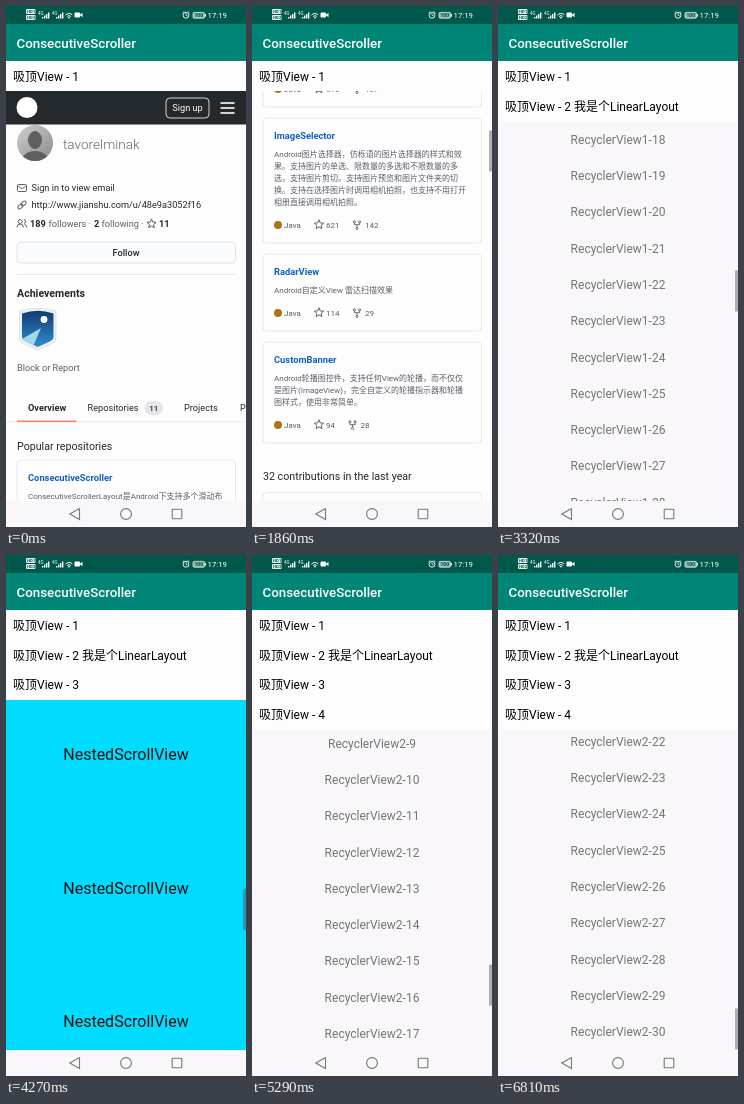
Animation of 240 by 521 pixels, one loop 6840 ms. Source, as an HTML page with a canvas:

```html
<!DOCTYPE html>
<html lang="zh-CN">
<head>
<meta charset="utf-8">
<title>ConsecutiveScroller</title>
<style>
html, body { margin: 0; width: 100%; height: 100%; overflow: hidden; background: #fff; }
canvas { display: block; width: 240px; height: 521px; }
</style>
</head>
<body>
<canvas id="stage"></canvas>
<script>
const W = 240, H = 521, LOOP = 6840, STEP = LOOP / 202;
const TOP = 55.4, BOTTOM = 495, BAR = 29.7, ROW = 36.3, BLOCK = 133.5;
const FONT = "Roboto, 'Noto Sans CJK SC', 'Noto Sans CJK', sans-serif";
const INK = '#24292e', GREY = '#586069', LINE = '#e1e4e8', BLUE = '#0d60c8', LINK = '#2f6cb3';
const WHITE = '#fefdfe', PAPER = '#f9f7fa';

const canvas = document.getElementById('stage');
const ratio = window.devicePixelRatio || 1;
canvas.width = W * ratio;
canvas.height = H * ratio;
const c = canvas.getContext('2d');

// Document layout, in pixels from the top of the unscrolled screen
const BAR2 = 1718, LIST1 = BAR2 + BAR;
const BAR3 = LIST1 + 30 * ROW, NESTED = BAR3 + BAR;
const BAR4 = NESTED + 6 * BLOCK, LIST2 = BAR4 + BAR;
const END = LIST2 + 30 * ROW - BOTTOM;

const bars = [
  ['吸顶View - 1', TOP],
  ['吸顶View - 2 我是个LinearLayout', BAR2],
  ['吸顶View - 3', BAR3],
  ['吸顶View - 4', BAR4]
];

const repos = [
  ['ConsecutiveScroller', 1265, 176, [
    'ConsecutiveScrollerLayout是Android下支持多个滑动布',
    '局(RecyclerView、WebView、ViewPager等)和普通控件',
    '(TextView、ImageView、LinearLayout、自定义View等)',
    '持续连贯滑动的容器，它使所有的子View像一个整体',
    '一样连续顺畅滑动。并且支持布局吸顶功能，以及滑',
    '动到指定的位置。']],
  ['GroupedRecyclerViewAdapter', 860, 148, [
    'GroupedRecyclerViewAdapter可以很方便的实现',
    'RecyclerView的分组显示，并且每个组都可以包含组',
    '头、组尾和子项；可以方便实现多种Type类型的列',
    '表，可以实现列表的展开收起功能，还可以实现头部',
    '悬浮吸顶功能等。']],
  ['LabelsView', 510, 107, [
    'Android标签列表控件，可以设置标签的选中效果。支',
    '持单选、多选，支持标签的自动换行，也支持自定义',
    '标签的样式。']],
  ['ImageSelector', 621, 142, [
    'Android图片选择器，仿栎语的图片选择器的样式和效',
    '果。支持图片的单选、限数量的多选和不限数量的多',
    '选，支持图片剪切。支持图片预览和图片文件夹的切',
    '换。支持在选择图片时调用相机拍照，也支持不用打开',
    '相册直接调用相机拍照。']],
  ['RadarView', 114, 29, ['Android自定义View 雷达扫描效果']],
  ['CustomBanner', 94, 28, [
    'Android轮播图控件，支持任何View的轮播，而不仅仅',
    '是图片(ImageView)，完全自定义的轮播指示器和轮播',
    '图样式，使用非常简单。']]
];

// Scroll path: step, offset, speed per step
const path = [
  [37.5, 0, 0], [55, 738, 39], [78, 1533, 35], [98, 2249.5, 31.5],
  [126, 3000.5, 26.7], [156, 3817.3, 22], [198, END, 0]
];

function scrollAt(n) {
  if (n <= path[0][0]) return 0;
  for (let i = 1; i < path.length; i++) {
    const [n0, a, va] = path[i - 1], [n1, b, vb] = path[i];
    if (n > n1) continue;
    const d = n1 - n0, u = (n - n0) / d, v = 1 - u;
    return a * v * v * (1 + 2 * u) + va * d * u * v * v
      + b * u * u * (3 - 2 * u) - vb * d * u * u * v;
  }
  return END;
}

function text(s, x, y, size, color, weight = 400, align = 'left') {
  c.font = `${weight} ${size}px ${FONT}`;
  c.textAlign = align;
  c.fillStyle = color;
  c.fillText(s, x, y + size * .355);
  return c.measureText(s).width;
}

function rect(x, y, w, h, color) {
  c.fillStyle = color;
  c.fillRect(x, y, w, h);
}

function box(x, y, w, h, r, stroke, fill, lw = .8) {
  c.beginPath();
  c.roundRect(x, y, w, h, r);
  if (fill) { c.fillStyle = fill; c.fill(); }
  if (stroke) { c.strokeStyle = stroke; c.lineWidth = lw; c.stroke(); }
}

function disc(x, y, r, fill, stroke, lw = 1) {
  c.beginPath();
  c.arc(x, y, r, 0, 7);
  if (fill) { c.fillStyle = fill; c.fill(); }
  if (stroke) { c.strokeStyle = stroke; c.lineWidth = lw; c.stroke(); }
}

function lines(color, lw, ...parts) {
  c.beginPath();
  for (const p of parts)
    for (let i = 0; i < p.length; i += 2) i ? c.lineTo(p[i], p[i + 1]) : c.moveTo(p[i], p[i + 1]);
  c.strokeStyle = color;
  c.lineWidth = lw;
  c.stroke();
}

function star(x, y) {
  const p = [];
  for (let i = 0; i <= 10; i++) {
    const r = i % 2 ? 2.2 : 4.9, a = i * Math.PI / 5;
    p.push(x + r * Math.sin(a), y - r * Math.cos(a));
  }
  lines(GREY, 1, p);
}

function fork(x, y) {
  for (const [dx, dy] of [[-2.6, -3.2], [2.6, -3.2], [0, 3.4]]) disc(x + dx, y + dy, 1.1, null, GREY, .9);
  lines(GREY, .9, [x - 2.6, y - 2, x - 2.6, y - .3, x + 2.6, y - .3, x + 2.6, y - 2], [x, y - .3, x, y + 2.2]);
}

function repoCard([name, stars, forks, desc], y) {
  const h = 65 + 12 * desc.length, sy = y + h - 18;
  box(11, y, 218.5, h, 4, LINE);
  text(name, 22, y + 18, 9.33, BLUE, 700);
  desc.forEach((s, i) => text(s, 22, y + 36.5 + 12 * i, 8, GREY));
  disc(26, sy, 4, '#b07219');
  text('Java', 32, sy, 8, GREY);
  star(67, sy - .3);
  const x = 74 + text(stars, 74, sy, 8, GREY) + 17.5;
  fork(x, sy);
  text(forks, x + 8, sy, 8, GREY);
  return h;
}

function pageHeader() {
  rect(0, 85, W, 33.5, INK);
  disc(21, 101.5, 10.5, '#fff');
  box(160, 92, 43, 20, 4, '#fff');
  text('Sign up', 181.5, 102, 9.2, '#fff', 400, 'center');
  for (const y of [97, 102, 107]) lines('#fff', 1.6, [214.5, y, 228.5, y]);
}

function profile() {
  const g = c.createLinearGradient(11, 119, 47, 155);
  g.addColorStop(0, '#cfcfcf');
  g.addColorStop(1, '#8b8b8b');
  disc(29, 137, 18, g);
  c.save();
  c.clip();
  c.fillStyle = '#5f5f5f';
  c.beginPath();
  c.ellipse(29, 134, 7, 9, 0, 0, 7);
  c.ellipse(29, 156, 14, 11, 0, 0, 7);
  c.fill();
  c.restore();
  text('tavorelminak', 57, 138, 13.6, '#666', 300);

  box(11.5, 178.5, 9, 7, 1, GREY, null, 1);
  lines(GREY, .9, [11.5, 179.5, 16, 183, 20.5, 179.5]);
  text('Sign in to view email', 25.5, 182, 9.2, INK);
  c.save();
  c.translate(16, 199);
  c.rotate(-.75);
  box(-5, -1.8, 5.6, 3.6, 1.8, GREY, null, 1);
  box(-.6, -1.8, 5.6, 3.6, 1.8, GREY, null, 1);
  c.restore();
  text('http://www.jianshu.com/u/48e9a3052f16', 25.5, 199, 9.2, INK);

  disc(14.2, 215.5, 2, null, GREY, 1);
  c.beginPath();
  c.arc(14.2, 221.3, 3.2, Math.PI, 0);
  c.moveTo(18, 213.6);
  c.arc(17.6, 215.5, 2, -1.4, 1.4);
  c.moveTo(18.3, 218.3);
  c.arc(17.6, 221.3, 3.2, -1.2, 0);
  c.stroke();
  text('189', 24, 218, 9.2, INK, 700);
  text('followers', 42.5, 218, 9.2, GREY);
  text('·', 82.5, 218, 9.2, GREY);
  text('2', 88, 218, 9.2, INK, 700);
  text('following', 95.5, 218, 9.2, GREY);
  text('·', 135, 218, 9.2, GREY);
  star(145.5, 217.8);
  text('11', 153, 218, 9.2, INK, 700);

  box(11, 236, 218.5, 21, 4, '#d9dce0', '#fafbfc');
  text('Follow', 120, 246.5, 9.2, INK, 500, 'center');
  rect(11, 268, 218.5, .8, LINE);
  text('Achievements', 11, 287, 10.6, INK, 700);
  badge();
  text('Block or Report', 11, 362, 9.2, GREY);
}

function shield(x, y, w, h) {
  c.beginPath();
  c.moveTo(x, y + 3);
  c.quadraticCurveTo(x + w / 2, y - 2.5, x + w, y + 3);
  c.lineTo(x + w, y + h * .72);
  c.quadraticCurveTo(x + w, y + h * .8, x + w * .88, y + h * .85);
  c.lineTo(x + w / 2, y + h);
  c.lineTo(x + w * .12, y + h * .85);
  c.quadraticCurveTo(x, y + h * .8, x, y + h * .72);
  c.closePath();
}

function badge() {
  shield(13.5, 302, 36.5, 42);
  c.fillStyle = '#eef1f4';
  c.fill();
  c.strokeStyle = '#d5dae0';
  c.lineWidth = .7;
  c.stroke();
  const g = c.createLinearGradient(0, 304, 0, 342);
  g.addColorStop(0, '#123a72');
  g.addColorStop(1, '#2f8fd0');
  shield(16, 304.5, 31.5, 36.5);
  c.fillStyle = g;
  c.fill();
  c.save();
  c.clip();
  disc(38, 313.5, 3.4, '#fff');
  c.fillStyle = '#9fd8ee';
  c.beginPath();
  c.moveTo(16, 333);
  c.lineTo(35, 322);
  c.lineTo(26, 343);
  c.lineTo(16, 343);
  c.fill();
  c.restore();
}

function tabs() {
  text('Overview', 22, 402, 9.2, INK, 700);
  text('Repositories', 81.5, 402, 9.2, INK);
  box(138.5, 395, 18.5, 14, 7, null, '#e4e6e9');
  text('11', 147.8, 402, 8, INK, 500, 'center');
  text('Projects', 178, 402, 9.2, INK);
  text('Packages', 234, 402, 9.2, INK);
  rect(0, 415.5, W, .8, LINE);
  rect(11, 414.5, 59.5, 1.6, '#f9826c');
  text('Popular repositories', 11, 440, 10.67, INK);
}

function activity() {
  text('32 contributions in the last year', 11, 1208.5, 10.67, INK);
  box(11, 1224.5, 218.5, 118, 4, LINE);
  const greens = ['#ebedf0', '#9be9a8', '#40c463'];
  for (let x = 0; x < 20; x++)
    for (let y = 0; y < 7; y++) {
      const n = Math.abs(Math.sin(x * 12.99 + y * 78.23) * 43758.5) % 1;
      rect(20 + x * 10.1, 1246 + y * 10.1, 7.4, 7.4, greens[n > .97 ? 2 : n > .92 ? 1 : 0]);
    }
  text('Less', 140, 1332, 8, GREY);
  greens.forEach((g, i) => rect(162 + i * 10, 1328.5, 7.4, 7.4, g));
  text('More', 196, 1332, 8, GREY);
  text('Contribution activity', 11, 1372, 10.67, INK);
  text('2021', 22, 1404, 8, INK, 700);
  rect(48, 1404, 181, .8, LINE);
  text('tavorelminak has no activity yet for this period.', 120, 1436, 8.5, GREY, 400, 'center');
  box(11, 1466, 218.5, 22, 4, LINE);
  text('Show more activity', 120, 1477, 8, BLUE, 500, 'center');
}

function footer() {
  text('© 2021 Zolmur, Inc.', 26, 1644, 8, GREY);
  const row = (y, items) => items.forEach(([s, x]) => text(s, x, y, 8, LINK));
  row(1644, [['Terms', 106], ['Privacy', 139], ['Security', 175.5]]);
  row(1656, [['Status', 94.5], ['Docs', 128]]);
  row(1674, [['Contact Zolmur', 14.5], ['Pricing', 80], ['API', 115], ['Training', 138], ['Blog', 177.5], ['About', 204.5]]);
}

function webPage(s) {
  rect(0, TOP, W, BAR2 - s - TOP, WHITE);
  c.save();
  c.translate(0, -s);
  if (s < 450) {
    pageHeader();
    profile();
    tabs();
  }
  let y = 454;
  for (const r of repos) y += repoCard(r, y) + 11;
  activity();
  footer();
  c.restore();
}

function list(name, top, s) {
  for (let i = 0; i < 30; i++) {
    const y = top - s + (i + .5) * ROW;
    if (y > 40 && y < 510) text(`${name}-${i + 1}`, 120, y, 12, '#757575', 400, 'center');
  }
}

function nested(s) {
  rect(0, NESTED - s, W, 6 * BLOCK, '#00dcff');
  for (let i = 0; i < 6; i++)
    text('NestedScrollView', 120, NESTED - s + (i + .5) * BLOCK, 16, '#111', 400, 'center');
}

function stickyBars(s) {
  bars.forEach(([label, top], i) => {
    const y = Math.max(i ? top - s : TOP, TOP + i * BAR);
    if (y > BOTTOM) return;
    // Whole-pixel edges keep stacked bars free of seams
    const edge = Math.round(y);
    rect(0, edge, W, Math.round(y + BAR) - edge, WHITE);
    text(label, 7, y + BAR / 2 + .4, 12, '#000');
  });
}

function signal(x) {
  for (let i = 0; i < 4; i++) rect(x + i * 2, 11 - i * 1.5, 1.4, 1.5 + i * 1.5, '#fff');
}

function statusBar() {
  rect(0, 0, W, 18, '#00574b');
  for (const [y, n] of [[3, 1], [9, 2]]) {
    box(20, y, 9.5, 5, 1, null, '#e6f0ee');
    text('HD', 21, y + 2.5, 4.2, '#00574b', 700);
    text(n, 27, y + 2.5, 4.2, '#00574b', 700);
  }
  text('4G', 32, 7, 4.5, '#fff');
  signal(36);
  text('4G', 46, 7, 4.5, '#fff');
  signal(50);
  c.lineCap = 'round';
  for (const r of [2.2, 4.4]) {
    c.beginPath();
    c.arc(63, 11.8, r, -2.4, -.74);
    c.strokeStyle = '#fff';
    c.lineWidth = 1;
    c.stroke();
  }
  c.lineCap = 'butt';
  disc(63, 11.6, .9, '#fff');
  box(68.5, 6.5, 5.5, 5, 1, null, '#fff');
  c.beginPath();
  c.moveTo(73.5, 9);
  c.lineTo(76.5, 6.8);
  c.lineTo(76.5, 11.2);
  c.fill();
  disc(180, 9.3, 2.9, null, '#fff', .9);
  lines('#fff', .8, [180, 7.5, 180, 9.4, 181.5, 9.9], [176.6, 7, 178.4, 5.3], [181.6, 5.3, 183.4, 7]);
  box(187, 6.4, 11.5, 5.8, 1.2, '#dfeae8', 'rgba(255,255,255,.55)');
  rect(199, 8, 1, 2.6, '#dfeae8');
  text('100', 192.7, 9.3, 5, '#00574b', 700, 'center');
  text('17:19', 201.5, 9.4, 7.8, '#fff');
}

function navBar() {
  rect(0, BOTTOM, W, H - BOTTOM, PAPER);
  const g = '#777';
  lines(g, 1.1, [73.5, 502.5, 63.8, 508, 73.5, 513.5, 73.5, 502.2]);
  disc(120, 508, 5.4, null, g, 1.1);
  box(166.2, 503.2, 9.6, 9.6, .5, g, null, 1.1);
}

function draw(n) {
  const s = scrollAt(n);
  c.setTransform(ratio, 0, 0, ratio, 0, 0);
  rect(0, 0, W, H, PAPER);
  c.save();
  c.beginPath();
  c.rect(0, 55, W, BOTTOM - 55);
  c.clip();
  if (s < BAR2) webPage(s);
  list('RecyclerView1', LIST1, s);
  nested(s);
  rect(0, LIST2 - s, W, 30 * ROW, PAPER);
  list('RecyclerView2', LIST2, s);
  stickyBars(s);
  if (s > 0) rect(237, 56 + s / END * 397.5, 3, 41, 'rgba(80,80,80,.45)');
  c.restore();
  rect(0, 18, W, 37, '#008577');
  text('ConsecutiveScroller', 10.5, 37.3, 13.33, '#fff', 500);
  statusBar();
  navBar();
}

const start = performance.now();
function tick() {
  const t = (performance.now() - start) % LOOP;
  draw(Math.floor(t / STEP + .15));
  requestAnimationFrame(tick);
}
tick();
</script>
</body>
</html>
```
